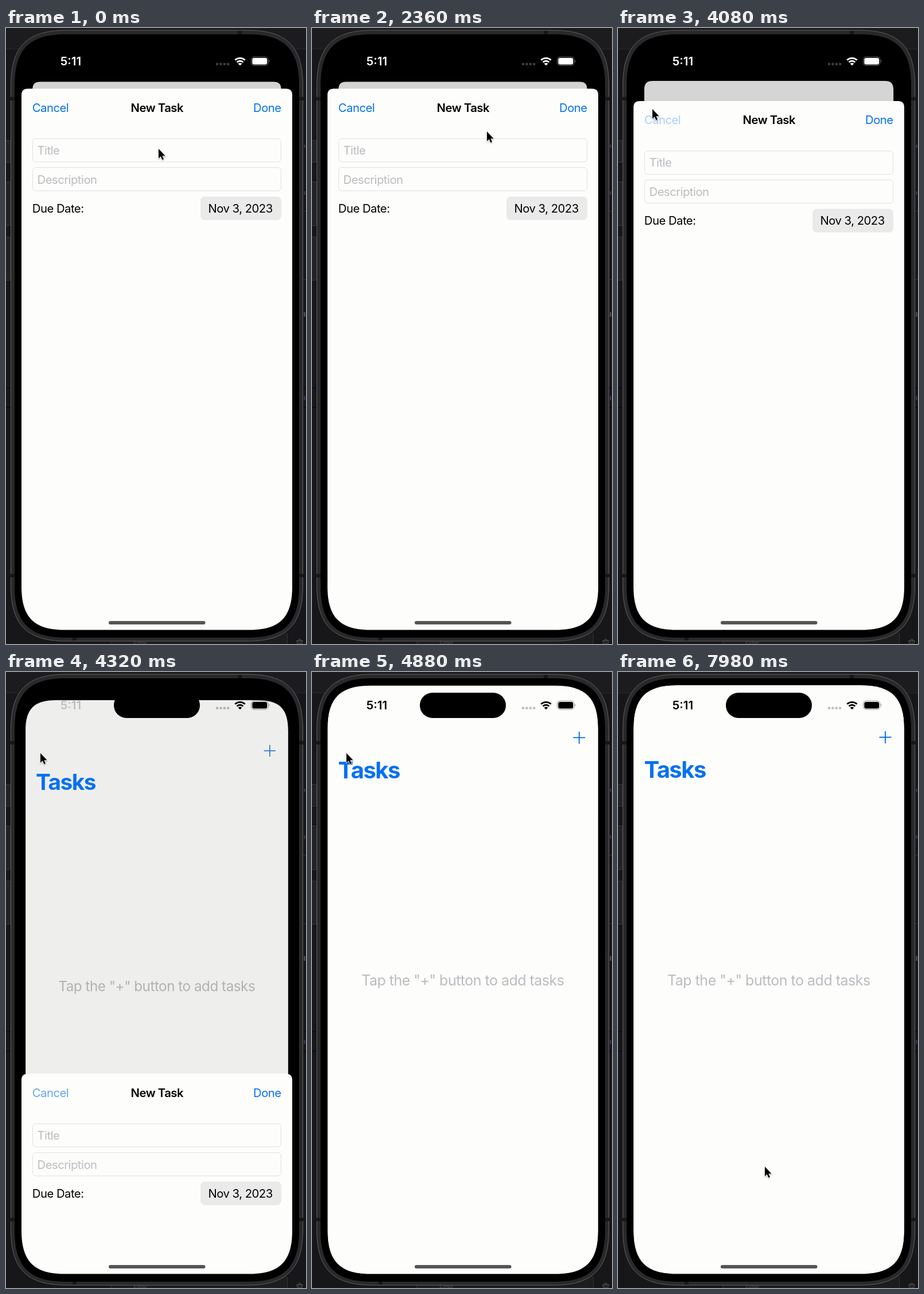
Write an HTML page that moves like this. It is 523x1071 px and loops after 8000 ms.

```html
<!DOCTYPE html>
<html lang="en">
<head>
<meta charset="utf-8">
<title>New task sheet</title>
<style>
html, body { margin: 0; width: 100%; height: 100%; overflow: hidden; background: #17171a; }
svg { display: block; width: 523px; height: 1071px; }
text { font: 20.3px Inter, "Liberation Sans", sans-serif; letter-spacing: -.025em; white-space: pre; }
.blue { fill: #0570f2; }
.hint { fill: #bcbcc0; }
.field { fill: #fdfdfc; stroke: #e1e1e0; }
#clock { font-size: 20.5px; font-weight: 600; letter-spacing: 0; }
#head { font-weight: 600; }
#tasks { font-size: 40px; font-weight: 700; letter-spacing: -.038em; }
#tip { font-size: 25px; letter-spacing: -.02em; }
#filter { font-size: 11px; fill: #47474a; }
</style>
</head>
<body>
<svg viewBox="0 0 523 1071">
  <defs>
    <clipPath id="screen"><path id="glass"/></clipPath>
    <filter id="shade" x="-50%" y="-50%" width="200%" height="200%">
      <feDropShadow dx="0" dy="1.2" stdDeviation="1.2" flood-opacity=".35"/>
    </filter>
  </defs>

  <!-- desktop behind the phone -->
  <rect width="523" height="1071" fill="#17171a"/>
  <rect width="523" height="36" fill="#1c1c1e"/>
  <path d="M0 36.5H523" stroke="#29292b"/>
  <g fill="#222225" stroke="#38383a">
    <rect x="-5" y="195.5" width="12" height="38"/>
    <rect x="-5" y="267.5" width="12" height="76"/>
    <rect x="-5" y="363.5" width="12" height="75"/>
  </g>
  <path d="M0 625.5H8M0 659.5H8M518 625.5H523M518 659.5H523" stroke="#050506"/>
  <path d="M518 318.5H523M518 437.5H523" stroke="#35353a"/>
  <path d="M520.5 203V208M520.5 284V290M520.5 640V647" stroke="#55356b" stroke-width="2"/>
  <path d="M520.5 494V502" stroke="#606064" stroke-width="2"/>
  <rect x="182.5" y="1050" width="308" height="24" rx="5" fill="#1d1d1f" stroke="#343436"/>
  <text id="filter" x="222" y="1074">Filter</text>
  <path d="M506 1065.5H518M510 1065V1063H514V1065M507.5 1066L508.5 1073M516.5 1066L515.5 1073M510.5 1068V1073M513.5 1068V1073" fill="none" stroke="#5b5b5d"/>

  <!-- phone body -->
  <path id="body" fill="#29292b" stroke="#606062"/>
  <path d="M404 8H411M116 1062H123M8 123H15M511 123H518M8 952H15M511 952H518" stroke="#171718" stroke-width="6"/>
  <path id="bezel"/>

  <g clip-path="url(#screen)">
    <rect x="27" y="23" width="472" height="1024"/>
    <g id="card">
      <path id="page"/>
      <path id="plus" d="M455.5 113.5H476.5M466 103V124" stroke-width="1.9"/>
      <text id="tasks" class="blue" x="45.4" y="184">Tasks</text>
      <text id="tip" x="86" y="544.5">Tap the "+" button to add tasks</text>
    </g>
    <rect x="188" y="36" width="150" height="44" rx="22"/>
    <text id="clock" x="113" y="65" text-anchor="middle">5:11</text>
    <g id="icons" fill="currentColor">
      <g opacity=".25">
        <circle cx="368" cy="62.7" r="2.3"/><circle cx="374.4" cy="62.7" r="2.3"/>
        <circle cx="380.8" cy="62.7" r="2.3"/><circle cx="387.2" cy="62.7" r="2.3"/>
      </g>
      <path d="M399.3 55.8A12.6 12.6 0 0 1 416.7 55.8M402.6 59.4A7.9 7.9 0 0 1 413.4 59.4" fill="none" stroke="currentColor" stroke-width="2.8"/>
      <path d="M408 65.3L404.7 62A4.7 4.7 0 0 1 411.3 62Z"/>
      <rect x="427.5" y="50.2" width="29.5" height="15" rx="4.8" fill="none" stroke="currentColor" opacity=".4"/>
      <path d="M458.5 55.3Q460.8 57.7 458.5 60.1Z" opacity=".45"/>
      <rect x="429.3" y="52" width="25.9" height="11.4" rx="3.2"/>
    </g>

    <g id="sheet">
      <path d="M27 1070V116.5Q27 105.5 38 105.5H488Q499 105.5 499 116.5V1070Z" fill="#fdfdfc"/>
      <text id="cancel" class="blue" x="45.8" y="146">Cancel</text>
      <text id="head" x="263.3" y="146" text-anchor="middle">New Task</text>
      <text class="blue" x="431" y="146">Done</text>
      <rect class="field" x="46.5" y="192.3" width="433" height="40.5" rx="5.5"/>
      <text class="hint" x="54.5" y="220">Title</text>
      <rect class="field" x="46.5" y="242.6" width="433" height="40.5" rx="5.5"/>
      <text class="hint" x="54.5" y="270.7">Description</text>
      <text x="45.8" y="321">Due Date:</text>
      <rect x="339" y="293" width="141" height="41" rx="7.5" fill="#eaeaeb"/>
      <text x="352.5" y="321">Nov 3, 2023</text>
    </g>
    <rect x="179" y="1031" width="168.5" height="6" rx="3" fill="#555557"/>
  </g>

  <path id="cursor" d="M0 0V16.8L3.8 13.3 6.4 19.2 9 18 6.4 12.3H11.6Z" stroke="#fff" stroke-width="1.3" paint-order="stroke" filter="url(#shade)"/>
</svg>
<script>
const $ = id => document.getElementById(id);
const set = (id, attrs) => {
  for (const key in attrs) $(id).setAttribute(key, attrs[key]);
};
const mix = (a, b, k) => a + (b - a) * k;
const ramp = (t, from, to) => Math.min(1, Math.max(0, (t - from) / (to - from)));
const ease = k => k * k * (3 - 2 * k);
const rgb = (a, b, k) => `rgb(${a.map((v, i) => Math.round(mix(v, b[i], k)))})`;

// rectangle whose corners start bending early, with smooth curvature
function smoothRect(x, y, w, h, r) {
  const e = 1.25 * r, c = .365 * r, d = e - c;
  return `M${x + e} ${y}h${w - 2 * e}c${d} 0 ${e} ${c} ${e} ${e}` +
    `v${h - 2 * e}c0 ${d} ${-c} ${e} ${-e} ${e}` +
    `h${2 * e - w}c${-d} 0 ${-e} ${-c} ${-e} ${-e}` +
    `v${2 * e - h}c0 ${-d} ${c} ${-e} ${e} ${-e}z`;
}

const LOOP = 8000, DISMISS = 4052;
// pointer moves: start, end, x, y
const moves = [[1400, 2300, 305, 180], [2450, 3350, 60, 141], [5000, 5850, 256, 860]];

function pointer(t) {
  let x = 266, y = 210;
  for (const [from, to, toX, toY] of moves) {
    const k = ease(ramp(t, from, to));
    x = mix(x, toX, k);
    y = mix(y, toY, k);
  }
  return `translate(${x} ${y})`;
}

// 1 = sheet fully open, 0 = dismissed, along a critically damped spring
function openness(t) {
  const s = Math.max(0, t - DISMISS) * .00795;
  return (1 + s) * Math.exp(-s);
}

function draw() {
  const t = performance.now() % LOOP;
  const p = openness(t), scale = 1 - .0816 * p;
  set('sheet', { transform: `translate(0 ${941 * (1 - p)})` });
  set('card', { transform: `translate(263 ${23 + 70.5 * p}) scale(${scale}) translate(-263 -23)` });
  set('page', {
    d: smoothRect(27, 23, 472, 1023.5, mix(60, 11, p) / scale),
    fill: rgb([253, 253, 252], [212, 212, 212], p)
  });
  set('plus', { stroke: rgb([5, 112, 242], [145, 145, 148], p) });
  set('tip', { fill: rgb([188, 188, 192], [160, 160, 163], p) });
  set('clock', { fill: rgb([255, 255, 255], [0, 0, 0], ramp(t, 4250, 4530)) });
  set('icons', { color: t < 4220 ? '#fff' : '#000' });
  set('cancel', { opacity: t < 3900 ? 1 : mix(.3, 1, ramp(t, DISMISS, 4640)) });
  set('cursor', { transform: pointer(t) });
  requestAnimationFrame(draw);
}

set('body', { d: smoothRect(8.5, 4, 509, 1062, 77) });
set('bezel', { d: smoothRect(15, 11, 496, 1049, 71) });
set('glass', { d: smoothRect(27, 23, 472, 1023.5, 60) });
draw();
</script>
</body>
</html>
```
